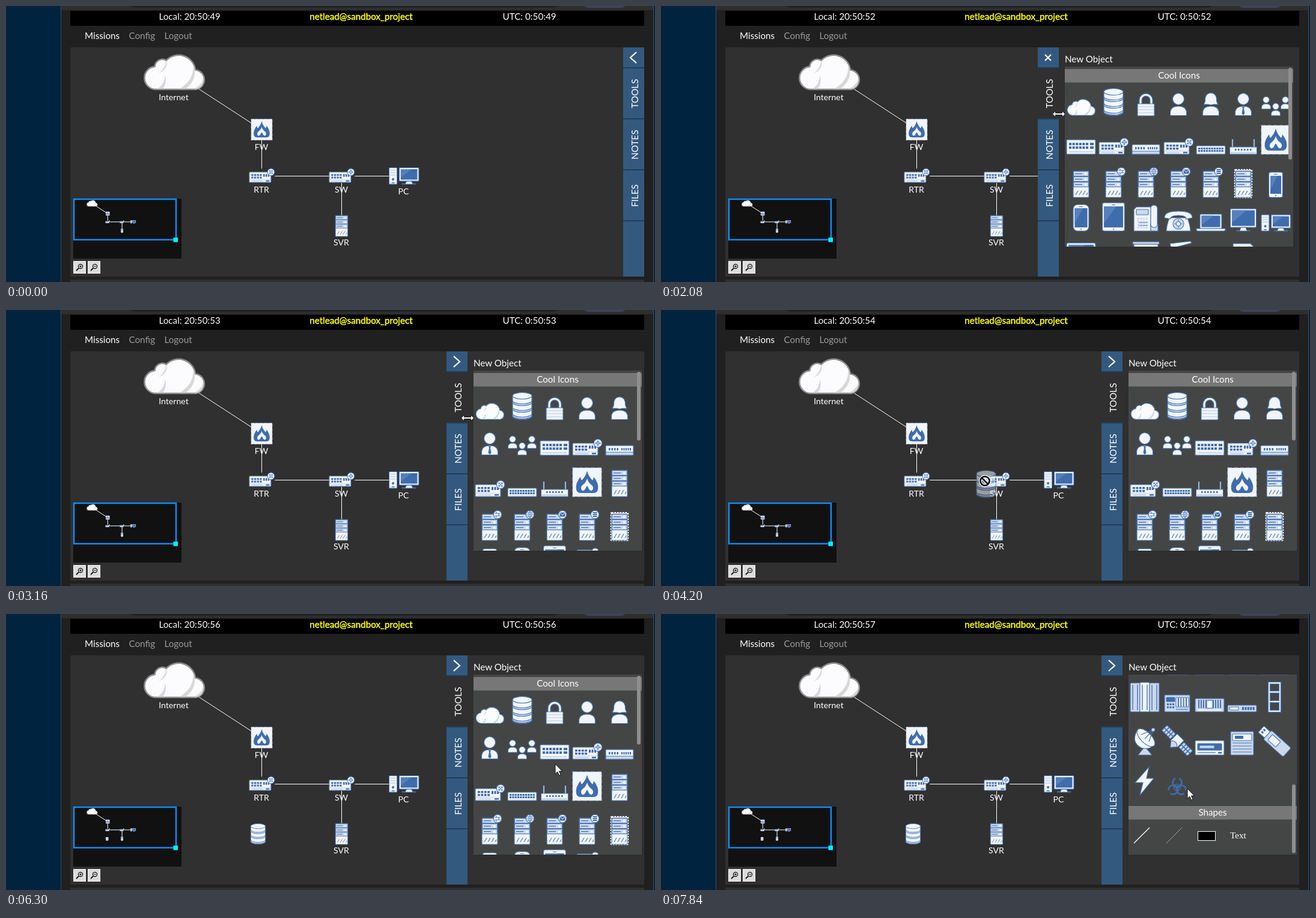
These frames come from a looping animation (1080x460 px, 8 s). An HTML page:

```html
<!DOCTYPE html>
<html lang="en">
<head>
<meta charset="utf-8">
<title>Network map</title>
<style>
html, body { margin: 0; width: 100%; height: 100%; overflow: hidden; background: #202020; }
#stage { display: block; width: 1080px; height: 460px; font: 15.2px Lato, sans-serif; }
text { fill: #fff; white-space: pre; }
.mid { text-anchor: middle; }
.small { font-size: 14.1px; text-anchor: middle; }
.dim { fill: #9a9a9a; }
.user { fill: #ff0; stroke: #ff0; stroke-width: .5px; }
.serif { font-family: "Liberation Serif", serif; }
.link { stroke: #fff; vector-effect: non-scaling-stroke; }
</style>
</head>
<body>
<svg id="stage" viewBox="0 0 1080 460"></svg>
<script>
const W = '#f1f5fd', M = '#cbd8ed', B = '#3f6cac', LINE = '#4674b4', NONE = 'stroke="none"';
const PANEL = '#303030', TAB = '#34597f', EDGE = '#203f5a';

const rect = (x, y, w, h, fill = W, rx = 1, more = '') =>
  `<rect x="${x}" y="${y}" width="${w}" height="${h}" rx="${rx}" fill="${fill}" ${more}/>`;
const flat = (x, y, w, h, fill = B) => rect(x, y, w, h, fill, 0, NONE);
const path = (d, fill = W, more = '') => `<path d="${d}" fill="${fill}" ${more}/>`;
const line = (d, w = 1.2, color = LINE) => path(d, 'none', `stroke="${color}" stroke-width="${w}"`);
const circle = (x, y, r, fill = W, more = '') => `<circle cx="${x}" cy="${y}" r="${r}" fill="${fill}" ${more}/>`;
const text = (x, y, s, cls = '') => `<text x="${x}" y="${y}" class="${cls}">${s}</text>`;
const rep = (n, f) => Array.from({ length: n }, (_, i) => f(i)).join('');
const group = (tf, body, more = '') => `<g transform="${tf}" ${more}>${body}</g>`;
const use = (id, x, y, s = 1) => `<use href="#${id}" transform="translate(${x} ${y}) scale(${s})"/>`;
const grid = (x, y, cols, rows, dx, dy, w, h, fill = B) =>
  rep(cols * rows, i => flat(x + i % cols * dx, y + Math.floor(i / cols) * dy, w, h, fill));

// Icons: the origin is the middle of the bottom edge.
const cloud = shade =>
  path('M-15-.7A9 9 0 0 1-15-18.6A6 6 0 0 1-6-23.4A13.2 13.2 0 0 1 16.7-16A7.7 7.7 0 0 1 17-.7Z', '#fcfcff') +
  path('M-6-23Q-4-17-12-13Q-7-17-6-23ZM-7-12Q-7-5-13-1H-9Q-5-6-7-12ZM15-20Q16-8 4-1H9Q18-8 16-18ZM23-10Q22-4 15-1H18Q24-3 23-10Z', shade, NONE);
const head = circle(0, -28, 9.5);
const bust = path('M-13.5-.5V-7Q-12-16 0-16Q12-16 13.5-7V-.5Z');
const user = head + bust;
const box = rect(-24, -20, 42, 20) + flat(-23, -6, 40, 1.2, M) + grid(-20, -16, 4, 2, 5.4, 5, 3.8, 3.4) +
  grid(3, -16, 3, 1, 4.5, 0, 3, 5) + flat(-20, -4, 22, 2.4, M) + flat(8, -4, 7, 2.4);
const badge = (x, y, glyph) => group(`translate(${x} ${y})`, circle(0, 0, 6.8) + glyph);
const plus = line('M-4.5 0H4.5M0-4.5V4.5M-4.5 0l2-1.5v3zM4.5 0l-2-1.5v3zM0-4.5l-1.5 2h3zM0 4.5l-1.5-2h3z', .8);
const cross = group('rotate(45)', plus);
const bays = rep(3, i => rect(-12.5, -43.5 + i * 9, 25, 8, M, .5) + flat(-10, -40 + i * 9, 12, 1.2) + flat(6, -41 + i * 9, 3.5, 3.5, W));
const server = rect(-13, -44, 26, 44) + bays + line('M-9-4l4-7M-3-4l4-7M3-4l4-7M9-4l2-4', 1.1);
const netServer = glyph => server + badge(13, -43, glyph);
const screenShine = (x, y, w, h) => rect(x, y, w, h, B, 0, NONE) + path(`M${x} ${y}h${w * .65}L${x} ${y + h * .8}Z`, '#5681bd', NONE);
const handset = (w, h, r) => rect(-w / 2, -h, w, h, W, r) + screenShine(-w / 2 + 2.5, -h + 6, w - 5, h - 12) +
  circle(0, -3, 1, B, NONE) + flat(-3, 3 - h, 6, 1);
const monitor = (w, h, foot) => rect(-w / 2, -h, w, h - foot) + screenShine(-w / 2 + 2.5, 2.5 - h, w - 5, h - foot - 5) +
  path(`M-4 ${-foot}h8l2 ${foot - 1}h5v1h-22v-1h5z`);

const icons = {
  cloud: cloud(M),
  db: path('M-16-40V-6A16 5.5 0 0 0 16-6V-40Z') + rep(3, i =>
    path(`M-16 ${-32 + i * 11}A16 5.5 0 0 0 16 ${-32 + i * 11}v3A16 5.5 0 0 1-16 ${-29 + i * 11}Z`, M)) +
    '<ellipse cy="-40" rx="16" ry="5.5"/>',
  lock: line('M-9-18V-26A9 9 0 0 1 9-26V-18', 5.5) + line('M-9-18V-26A9 9 0 0 1 9-26V-18', 3, W) +
    rect(-14, -20, 28, 20) + flat(-13, -6, 26, 1.5, M) + flat(-13, -11, 26, 1.5, M) + flat(-13, -16, 26, 1.5, M),
  user,
  woman: path('M-12-19Q-9-23-9.5-29Q-8-38 0-38Q8-38 9.5-29Q9-23 12-19Z') + bust + circle(0, -26, 7.5, W, NONE),
  tie: user + path('M-2-15H2L1-12L2.5-4L0-1L-2.5-4L-1-12Z', B, NONE),
  group: [[-16, -11], [16, -11], [0, 0]].map(([x, y]) => group(`translate(${x} ${y}) scale(.56)`, user, 'stroke-width="1.8"')).join(''),
  panel: rect(-24, -24, 48, 24) + grid(-20, -19, 6, 2, 5.6, 6, 4, 4) + grid(15, -19, 1, 2, 0, 6, 6, 4) + flat(-20, -5, 40, 2, M),
  sw: box + badge(18, -20, plus),
  hub: rect(-23, -16, 46, 16) + rect(-23, -5, 46, 5, M) + grid(-18, -12, 4, 1, 4.5, 0, 2.5, 4) + grid(3, -12, 5, 1, 3.5, 0, 2, 4),
  router: box + badge(18, -20, cross),
  patch: rect(-24, -14, 48, 14) + grid(-21, -11, 10, 2, 4.3, 4, 3.2, 3) + flat(-21, -2.5, 42, 1, M),
  wifi: line('M-18-12V-25M18-12V-25', 2.6) + line('M-18-12V-25M18-12V-25', 1, W) + rect(-22.5, -12, 45, 12) +
    flat(-21, -4, 42, 3, M) + grid(-14, -9, 6, 1, 5, 0, 2.5, 3),
  fw: rect(-24, -48, 48, 48, W, 0, 'stroke="#afc3e3" stroke-dasharray="7 3"') +
    path('M0-43Q2-34 9-27Q11-30 11-33Q20-22 18-12Q17-6 10-6H-10Q-17-6-18-12Q-20-22-11-33Q-11-30-9-27Q-2-34 0-43Z', B, NONE) +
    path('M0-30Q2-23 9-18Q12-12 7-9.5Q3-11 2-15L0-18L-2-15Q-3-11-7-9.5Q-12-12-9-18Q-2-23 0-30Z', W, NONE),
  server,
  srvWall: netServer(line('M-5-2H5M-5 2H5M-2-5V-2M2-2V2M-2 2V5', 1)),
  srvWeb: netServer(line('M-6 0H6M0-6V6M0-6Q-6 0 0 6Q6 0 0-6M-5-3H5M-5 3H5', .8)),
  srvMail: netServer(rect(-4, -3, 8, 6, B, 0) + line('M-4-3L0 1L4-3', 1, W)),
  srvData: netServer(grid(-3.5, -4, 1, 3, 0, 3, 7, 2)),
  srvDash: rect(-14, -46, 28, 46, W, 1, 'stroke="#fff" stroke-width="2.5" stroke-dasharray="2.5 2"') + server,
  phone: handset(23, 42, 3),
  phone2: handset(26, 44, 7),
  tablet: handset(37, 47, 3),
  desk: path('M-20 0V-36L-16-40H8V0Z') + rect(-16, -36, 20, 9, M) + grid(-14, -22, 4, 4, 4.6, 5, 3, 3, M) +
    line('M-12-14H3M-12-9H3') + path('M8 0V-12H20V0Z', M) + rect(8, -43, 11, 37, W, 5),
  dial: path('M-15-22Q-20-8-20 0H20Q20-8 15-22Z') + path('M-23-22Q-24-33 0-33Q24-33 23-22L13-20Q13-26 0-26Q-13-26-13-20Z') +
    circle(0, -12, 9, M) + circle(0, -12, 3.5) + line('M0-19v3M0-8v3M-7-12h3M4-12h3'),
  laptop: rect(-18, -28, 36, 24) + screenShine(-15.5, -25.5, 31, 19) + path('M-24-4H24V-1L22 0H-22L-24-1Z'),
  monitor: monitor(43, 37, 6),
  pc: rect(-24, -27, 13, 27) + rep(3, i => flat(-22, -24 + i * 4, 9, 2, M)) + circle(-17.5, -8, 2, B, NONE) +
    flat(-20, -3, 5, 1.4) + group('translate(8.5 0)', monitor(32, 27, 5)),
  imac: rect(-24, -45, 48, 37, W, 2) + screenShine(-21, -42, 42, 27) + path('M-4-8H4L6-2H11V0H-11V-2H-6Z', M),
  beam: rect(-24, -16, 48, 13, M, 2) + line('M-20-12H0M-20-8H0M-18-1H-12M14-1H19', 1.6) + circle(6, -9.5, 8) + circle(6, -9.5, 5, M) + circle(6, -9.5, 2.5, B),
  board: line('M0-8V0M-5 0L0-5L5 0') + rect(-20, -43, 40, 35) + rect(-22, -47, 44, 4, M),
  copier: path('M-14-44L20-48L22-45L-12-36Z') + path('M-16-36H18V0H-16Z') + path('M-16-28L-25-32V-29L-16-24ZM18-22L25-24V-20L18-17Z', M) +
    rep(3, i => rect(-14, -22 + i * 7, 30, 6, M)) + grid(-4, -32, 4, 1, 4.5, 0, 3, 4),
  fax: path('M-8-20L-5-33H14L13-20Z') + path('M-24 0V-17L-18-23H20L24-17V0Z') + rect(-22, -20, 9, 18, M) +
    grid(0, -15, 5, 3, 4.2, 4, 2.6, 2.2) + line('M-10-12H-2M-10-5H20'),
  printer: path('M-17-32V-44H12L17-39V-32Z') + rect(-22, -32, 44, 32) + flat(-16, -28, 14, 4) + rect(-20, -20, 40, 7, M) + rect(-20, -10, 40, 8, M) + line('M-4-16H4M-4-6H4'),
  scanner: path('M-22-12L20-36L23-32L-18-8Z') + path('M-23-9H23V0H-23Z') + flat(-18, -6, 26, 3, M) + flat(14, -6, 5, 3),
  cabinet: rect(-24, -48, 16, 48, M) + rect(-8, -49, 16, 49) + rect(8, -48, 16, 48, M) + line('M-20-45V-3M-12-45V-3M-4-45V-3M4-45V-3M12-45V-3M20-45V-3', 1.4),
  blade: rect(-21, -28, 42, 28, M) + rep(5, i => rect(-2 + i * 4.4, -24, 3.4, 16)) + rect(-18, -24, 14, 7, B) +
    grid(-17, -14, 3, 2, 4.5, 5, 3, 3) + line('M-2-4H18'),
  chassis: rect(-24, -22, 48, 22, M) + rep(10, i => line(`M${-18 + i * 4}-20V-6`, 2)) + rect(-5, -19, 10, 13) + flat(-20, -4, 40, 2, W),
  slim: rect(-24, -11, 48, 11, M) + rect(-21, -8, 15, 5) + grid(0, -8, 5, 1, 4.4, 0, 3, 5),
  rack: line('M-9-48V-1H9V-48ZM-9-33H9M-9-17H9', 4.5) + line('M-9-48V-1H9V-48ZM-9-33H9M-9-17H9', 1.8, W),
  dish: path('M0-14L-11 0H12Z', M) + path('M-12-42Q-24-22-6-12Q8-8 15-17Z') + '<ellipse cx="2" cy="-29" rx="19" ry="9" transform="rotate(45 2 -29)" fill="#f1f5fd"/>' +
    line('M0-27L14-42M-6-34L14-42L7-22') + circle(14, -42, 3, M),
  sat: group('translate(0 -24) rotate(45)', rect(-30, -6, 20, 12, M) + rect(10, -6, 20, 12, M) +
    line('M-25-6V6M-20-6V6M-15-6V6M15-6V6M20-6V6M25-6V6M-30 0H30', 1.8) + rect(-8, -8, 16, 16) + path('M-7 8A8 8 0 0 1 7 8L0 16Z', M)),
  drive: rect(-24, -24, 48, 24) + rect(-20, -19, 40, 11, B) + rect(-17, -16, 25, 5, M) + line('M-20-4H10') + flat(14, -5, 6, 2.5),
  ups: rect(-19, -39, 38, 39, M) + rect(-16, -35, 32, 11) + flat(-12, -32, 14, 5) + line('M-16-20H16M-16-15H16M-16-10H16M-16-5H16'),
  usb: group('translate(0 -23) rotate(42)', rect(-30, -7, 14, 14) + rect(-16, -10, 44, 20, M, 3) + rect(-10, -6, 18, 12) + flat(-27, -4, 4, 3) + flat(-27, 1, 4, 3)),
  bolt: path('M7-47L-16-21H-3L-8 0L15-28H3Z'),
  bio: group('translate(0 -13)', rep(3, i => group(`rotate(${i * 120})`, line('M-3-15A7.5 7.5 0 1 0 3-15M0-3V3', 2.6, B))) + circle(0, 0, 5.5, 'none', `stroke="${B}" stroke-width="1.6"`))
};

const link = (x1, y1, x2, y2) => `<line class="link" x1="${x1}" y1="${y1}" x2="${x2}" y2="${y2}"/>`;
const dbNode = use('db', 419.5, 384, .76);
const nodes = link(279, 111, 425, 206) + link(425.5, 206, 425.5, 271) + link(447, 283.5, 538, 283.5) +
  link(580, 283.5, 638, 283.5) + link(558.5, 295, 558.5, 349) +
  group('translate(279.5 140.5) scale(2.13)', cloud('#d8d8d8'), 'stroke="#8c8c8c" stroke-width="1.2"') +
  use('fw', 425.5, 223.5, .73) + use('router', 425.5, 294, .86) + use('sw', 558.5, 294, .86) +
  use('pc', 662, 297, 1.02) + use('server', 558.5, 384, .79);
const labels = [['Internet', 279, 157], ['FW', 425, 240], ['RTR', 425, 311], ['SW', 558, 311], ['PC', 661.5, 314], ['SVR', 558, 399]]
  .map(([s, x, y]) => text(x, y, s, 'small')).join('');
const zoom = (x, sign) => rect(x + .5, 425.5, 20, 20, '#dcdcdc', 0, 'stroke="#f4f4f4"') +
  circle(x + 12, 434, 3.6, 'none', 'stroke="#111" stroke-width="1.2"') +
  line(`M${x + 9} 437l-4 4`, 1.8, '#111') + line(`M${x + 10} 434h4${sign}`, 1, '#111');

document.getElementById('stage').innerHTML =
  `<defs>${Object.entries(icons).map(([id, s]) => `<g id="${id}" fill="${W}" stroke="${LINE}" stroke-width="1.1">${s}</g>`).join('')}</defs>` +
  flat(0, 0, 1080, 460, '#002340') + flat(91, 0, 987, 460, '#3b4f61') + flat(92, 0, 985, 460, '#202020') +
  flat(92, 0, 985, 7, '#2e2e2e') + rect(205, -20, 716, 22.5, '#1f1f1f', 10) + rect(960, -20, 73, 23, '#3a475d', 9) +
  flat(107, 8, 955, 25, '#000') + '<g id="clock"></g>' + text(591, 23, 'netlead@sandbox_project', 'mid user') +
  text(131, 55, 'Missions') + text(204.5, 55, 'Config', 'dim') + text(263.5, 55, 'Logout', 'dim') +
  flat(107, 69, 955, 382, PANEL) + flat(107, 456, 955, 4, PANEL) +
  `<g id="map"></g>${labels}` + flat(112, 321, 180, 100, '#111') +
  '<g id="mini" transform="translate(93.1 309.1) scale(.179)"></g>' +
  rect(113, 322, 170, 67.5, 'none', 0, 'stroke="#0a90ff" stroke-width="2.4"') + flat(278.5, 386, 7.5, 7.5, '#00f0ff') +
  zoom(112, 'm-2-2v4') + zoom(136, '') +
  '<g id="side"></g><g id="pointer"></g>';

// Tracks of [time, value...]; each value holds until the next one.
const tabs = [[0, 1027], [780, 800], [1060, 627], [2350, 645], [2600, 669], [2880, 705], [3160, 733]];
const clock = [[0, 49], [250, 50], [1060, 51], [2080, 52], [3160, 53], [3950, 54], [5000, 55], [6050, 56], [7070, 57]];
const scrolls = [[0, 0], [6570, 114], [6820, 228], [7070, 342], [7340, 456], [7590, 469]];
const moves = [[0, -50, -50], [250, 1039, 157], [500, 1040, 88], [1060, 1032, 142], [1330, 985, 220], [1580, 900, 314],
  [1830, 750, 250], [2080, 662, 180], [2350, 680, 180], [2600, 704, 180], [2880, 740, 180], [3160, 768, 180],
  [3430, 815, 164], [3680, 857, 158], [3950, 700, 220], [4200, 539, 285], [4470, 480, 330], [4720, 432, 359],
  [5000, 419, 367], [5530, 445, 366], [5800, 620, 335], [6050, 800, 280], [6300, 914, 250], [7340, 905, 262],
  [7590, 889, 280], [7840, 876, 291]];
const at = (track, t) => track.filter(k => k[0] <= t).pop().slice(1);

const rows = {
  7: [183, 247, 319, 375, 440],
  6: [183, 239, 311, 377, 433],
  5: [183, 242, 311, 384, 440, 499, 570, 632, 704, 771]
};
const thumbs = { 7: 153, 6: 139, 5: 114.5 };
const names = Object.keys(icons);

function listing(x, scroll) {
  const w = Math.max(280, 1052 - x), cols = Math.max(5, Math.floor(w / 54)), y0 = -101 - scroll;
  const bar = (y, s) => flat(0, y, w, 22.5, '#777') + text(w / 2, y + 16, s, 'mid');
  const items = names.map((id, i) => {
    const y = rows[cols][Math.floor(i / cols)];
    return y ? use(id, 27 + i % cols * 54, y) : '';
  }).join('');
  const shapes = cols > 5 ? '' : bar(789, 'Shapes') + line('M9 851L35 825', 1.3, '#fff') +
    path('M63 851L89 825', 'none', 'stroke="#fff" stroke-dasharray="1.5 1.5"') +
    rect(115.5, 831.5, 29, 15, '#000', 0, 'stroke="#fff"') + text(169, 843, 'Text', 'serif');
  return `<svg x="${x}" y="101" width="${Math.min(w, 1062 - x)}" height="300">` + flat(0, 0, w, 300, '#444645') +
    group(`translate(0 ${y0})`, bar(105, 'Cool Icons') + items + shapes) +
    rect(w - 8, 2 + scroll * 181 / 469, 6, thumbs[cols], '#8e8e8e', 3) + '</svg>';
}

function side(t) {
  const [x] = at(tabs, t), open = x < 1027;
  const mark = !open ? 'M22 8L12 17L22 26' : t < 2350 ? 'M12 12L22 22M22 12L12 22' : 'M12 8L22 17L12 26';
  const strip = flat(0, 69, 35, 382, TAB) + (open ? flat(0, 104, 35, 84, PANEL) : '') +
    rep(4, i => flat(0, 102 + i * 85, 35, 2, EDGE)) + group('translate(0 69)', line(mark, 2.2, '#fff')) +
    ['TOOLS', 'NOTES', 'FILES'].map((s, i) => group(`translate(24.5 ${146 + i * 85}) rotate(-90)`, text(0, 0, s, 'mid'))).join('');
  return (open ? flat(x + 35, 69, 1027 - x, 382, PANEL) + text(x + 45, 94, 'New Object') + listing(x + 45, at(scrolls, t)[0]) : '') +
    group(`translate(${x} 0)`, strip);
}

function pointer(t) {
  const [x, y] = at(moves, t);
  const place = s => group(`translate(${x} ${y})`, s);
  if (t >= 2080 && t < 3430)
    return place(path('M-10.5 0L-5.5-5V-1.5H5.5V-5L10.5 0L5.5 5V1.5H-5.5V5Z', '#fff', 'stroke="#000" stroke-width=".8"'));
  if (t >= 3950 && t < 5280)
    return `<g opacity=".55">${use('db', x + 2, y + 28)}</g>` +
      place(circle(0, 0, 7.5, 'none', 'stroke="#fff" stroke-width="5"') + line('M-5-5L5 5', 5, '#fff') +
        circle(0, 0, 7.5, 'none', 'stroke="#000" stroke-width="2.6"') + line('M-5-5L5 5', 2.6, '#000'));
  return place(path('M0 0V16.5L3.8 13L6.4 19L9 17.8L6.4 12H11.5Z', '#fff', 'stroke="#000" stroke-width=".9"'));
}

const fill = (id, s) => {
  const el = document.getElementById(id);
  if (el.shown !== s) { el.innerHTML = s; el.shown = s; }
};

function draw(t) {
  const [sec] = at(clock, t), all = nodes + (t >= 5280 ? dbNode : '');
  fill('clock', text(254.5, 23, 'Local: 20:50:' + sec) + text(826.5, 23, 'UTC: 0:50:' + sec));
  fill('map', all);
  fill('mini', all);
  fill('side', side(t));
  fill('pointer', pointer(t));
}

const start = performance.now();
function tick() {
  draw((performance.now() - start) % 8000);
  requestAnimationFrame(tick);
}
tick();
</script>
</body>
</html>
```
